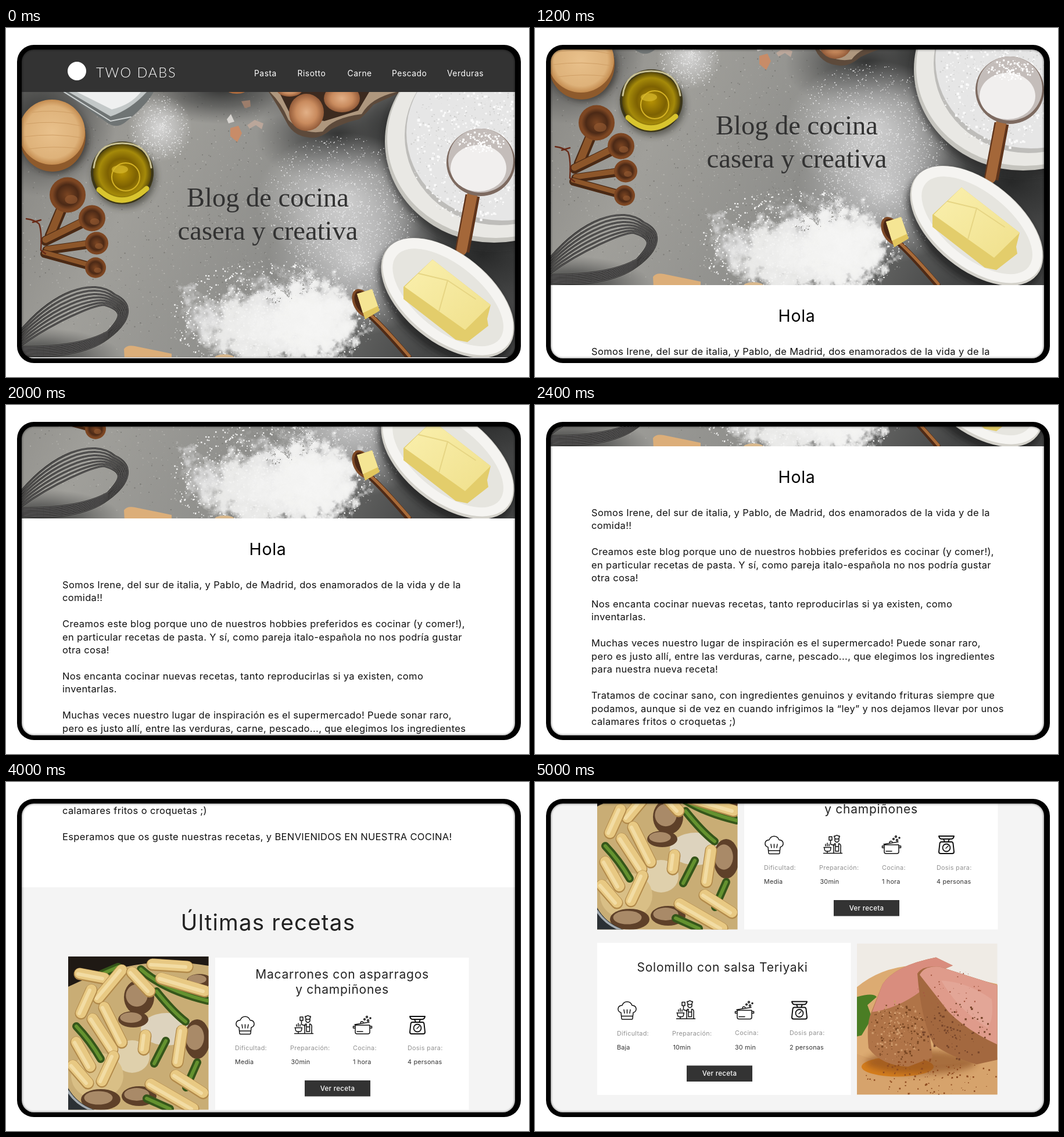
Recreate the animation shown at these times as an HTML page. Size 900 by 600 pixels, loop 6 s.

```html
<!DOCTYPE html>
<html lang="es">
<head>
<meta charset="utf-8">
<title>Blog de cocina</title>
<style>
  html, body { margin: 0; width: 100%; height: 100%; overflow: hidden; background: #fff; }
  svg { position: absolute; left: 0; top: 0; display: block; }
  text { font-family: Inter, "Open Sans", sans-serif; font-optical-sizing: none; white-space: pre; }
  .brand { font: 300 23.5px Lato, sans-serif; letter-spacing: 2px; fill: #fff; }
  .nav { font-size: 13.8px; letter-spacing: .55px; fill: #fff; }
  .title { font: 46.5px "Liberation Serif", serif; fill: #323232; text-anchor: middle; }
  .hello { font-size: 28.5px; letter-spacing: .7px; text-anchor: middle; }
  .body { font-size: 16.5px; letter-spacing: .35px; fill: #111; }
  .latest { font-size: 38.5px; letter-spacing: 1.2px; fill: #222; text-anchor: middle; }
  .dish { font-size: 21px; letter-spacing: .75px; fill: #222; text-anchor: middle; }
  .label { font-size: 10.8px; letter-spacing: .3px; fill: #929292; }
  .value { font-size: 10.8px; letter-spacing: .2px; fill: #333; }
  .button { font-size: 11.5px; font-weight: 500; letter-spacing: .3px; fill: #fff; text-anchor: middle; }
  .icon { fill: none; stroke: #111; stroke-width: 1.5; stroke-linecap: round; stroke-linejoin: round; }
</style>
</head>
<body>
<svg id="stage" width="900" height="600" viewBox="0 0 900 600"></svg>
<script>
const LOOP = 6000, HOLD = 1000, STEP = 200, STEPS = 21, TRAVEL = 1300;

const text = (cls, x, y, s) => `<text class="${cls}" x="${x}" y="${y}">${s}</text>`;
const rect = (x, y, w, h, fill) => `<rect x="${x}" y="${y}" width="${w}" height="${h}" fill="${fill}"/>`;
const oval = (x, y, rx, ry, fill, more = '') => `<ellipse cx="${x}" cy="${y}" rx="${rx}" ry="${ry}" fill="${fill}" ${more}/>`;
const shape = (d, fill, more = '') => `<path d="${d}" fill="${fill}" ${more}/>`;
const line = (d, color, w, cap = 'round') =>
  `<path d="${d}" fill="none" stroke="${color}" stroke-width="${w}" stroke-linecap="${cap}"/>`;
const at = (x, y, s, more = '') => `<g transform="translate(${x} ${y})" ${more}>${s}</g>`;
const clip = (id, s) => `<g clip-path="url(#${id})">${s}</g>`;
const filtered = (id, s) => `<g filter="url(#${id})">${s}</g>`;

function random(seed) {
  return () => (seed = (seed * 16807) % 2147483647) / 2147483647;
}

// Small squares scattered densely in the middle of an oval
function specks(seed, count, cx, cy, rx, ry, fill, max = 2) {
  const rnd = random(seed);
  let d = '';
  for (let i = 0; i < count; i++) {
    const a = rnd() * Math.PI * 2, r = rnd() ** .7, s = (.5 + rnd() * max).toFixed(1);
    d += `M${(cx + Math.cos(a) * r * rx).toFixed(1)} ${(cy + Math.sin(a) * r * ry).toFixed(1)}h${s}v${s}h-${s}z`;
  }
  return shape(d, fill);
}

const gradient = (id, stops) => `<radialGradient id="${id}">${stops.map(([o, c, a = 1]) =>
  `<stop offset="${o}" stop-color="${c}" stop-opacity="${a}"/>`).join('')}</radialGradient>`;

const defs = `<defs>
  <clipPath id="screen"><rect x="26" y="36" width="850.5" height="532.5" rx="21"/></clipPath>
  <clipPath id="heroBox"><rect x="26" y="110" width="851" height="456"/></clipPath>
  <clipPath id="pastaBox"><rect width="241.5" height="263.5"/></clipPath>
  <clipPath id="meatBox"><rect width="241.5" height="260"/></clipPath>
  <filter id="soft" x="-30%" y="-30%" width="160%" height="160%"><feGaussianBlur stdDeviation="6"/></filter>
  <filter id="edge"><feGaussianBlur stdDeviation="1.4"/></filter>
  <filter id="ragged" x="-20%" y="-20%" width="140%" height="140%">
    <feTurbulence type="fractalNoise" baseFrequency=".045" numOctaves="5" seed="4"/>
    <feDisplacementMap in="SourceGraphic" scale="75" xChannelSelector="R" yChannelSelector="G"/>
  </filter>
  <linearGradient id="stone" x2="1" y2=".25">
    <stop offset="0" stop-color="#868581"/><stop offset=".3" stop-color="#a09f9a"/>
    <stop offset=".6" stop-color="#8f8f8c"/><stop offset="1" stop-color="#454646"/>
  </linearGradient>
  <linearGradient id="butter" x2="1" y2="1">
    <stop offset="0" stop-color="#faf0ae"/><stop offset="1" stop-color="#f0e08c"/>
  </linearGradient>
  ${gradient('dark', [[0, '#222323', .85], [.5, '#303131', .5], [1, '#444', 0]])}
  ${gradient('flour', [[0, '#f6f6f5'], [.75, '#f2f2f1', .9], [1, '#e8e8e8', .1]])}
  ${gradient('dust', [[0, '#e9e9ea', .75], [.5, '#e0e0e1', .45], [1, '#ddd', 0]])}
  ${gradient('oil', [[0, '#b99505'], [.5, '#7d6102'], [.8, '#a58a0a'], [1, '#574708']])}
  ${gradient('wood', [[0, '#e9c18c'], [.8, '#deb27a'], [1, '#c48c50']])}
  ${gradient('cup', [[0, '#7b4522'], [.7, '#4b2916'], [1, '#7c4623']])}
  ${gradient('egg', [[0, '#e2b087'], [.6, '#c98b5e'], [1, '#935b39']])}
</defs>`;

function measuringSpoon(x, y, r, hx, hy, w) {
  return line(`M${x} ${y}L${hx} ${hy}`, '#4a2914', w + 2) +
    line(`M${x - 1} ${y - 2}L${hx} ${hy - 2}`, '#8d562a', w - 4) +
    oval(x, y, r, r * .98, '#7d4622') + oval(x, y, r * .84, r * .82, 'url(#cup)') +
    oval(x + r * .2, y + r * .25, r * .35, r * .25, '#9a5e34', 'opacity=".6"');
}

function hero() {
  const backdrop = rect(26, 110, 851, 456, 'url(#stone)') +
    specks(3, 900, 330, 340, 330, 250, '#b2b1ac', 1.6) + specks(7, 700, 330, 340, 330, 250, '#7b7a76', 1.6) +
    oval(570, 185, 140, 85, 'url(#dark)') + oval(370, 105, 150, 60, 'url(#dark)') +
    oval(670, 165, 80, 100, 'url(#dark)') + oval(820, 390, 170, 100, 'url(#dark)') +
    oval(60, 160, 130, 130, 'url(#dark)') + oval(60, 566, 140, 50, 'url(#dark)');

  const flour = oval(265, 172, 55, 58, 'url(#dust)') + specks(5, 420, 265, 172, 52, 58, '#eee', 1.3) +
    oval(580, 295, 150, 115, 'url(#dust)') + oval(600, 400, 150, 130, 'url(#dust)') +
    specks(11, 1300, 575, 300, 135, 115, '#ededee', 1.2) + specks(13, 700, 600, 410, 110, 110, '#e6e6e7', 1.2) +
    filtered('ragged', oval(470, 515, 150, 72, 'url(#flour)') + oval(490, 455, 95, 42, 'url(#dust)') +
      oval(530, 500, 90, 75, 'url(#flour)') + oval(310, 460, 16, 24, 'url(#dust)') + oval(340, 500, 45, 42, 'url(#dust)')) +
    specks(23, 1200, 460, 495, 180, 95, '#f4f4f3', 2.2) +
    filtered('ragged', specks(31, 60, 470, 430, 80, 40, '#8f8f8c', 4));

  const left = shape('M98 110L176 164Q190 173 204 163Q240 135 254 110Z', '#6f7474') +
    shape('M108 110L180 152Q215 140 242 110Z', '#c3c8c8') + shape('M122 110L182 140Q215 132 232 110Z', '#eff0f0') +
    line('M100 110L180 160L215 153', '#cfd3d3', 2) +
    oval(85, 192, 56, 58, '#2e2a27', 'filter="url(#soft)" opacity=".7"') +
    oval(80, 186, 57, 61, '#8e5a2c') + oval(79, 179, 57, 56, 'url(#wood)') +
    line('M35 165Q80 158 128 168M31 187Q80 180 133 189M40 208Q80 202 125 207M45 145Q80 140 118 147', '#cf9f66', 1) +
    oval(203, 256, 55, 53, '#2d2d25', 'filter="url(#soft)" opacity=".6"') +
    oval(200, 249, 54, 54, '#3c3618') + oval(200, 249, 50, 49, 'url(#oil)') +
    line('M151 240Q156 198 200 198Q244 198 250 240', '#c9c193', 3) +
    line('M160 278Q200 315 242 276', '#d9c52e', 9) +
    `<circle cx="206" cy="256" r="24" fill="none" stroke="#d5b324" stroke-width="2"/>` +
    oval(196, 243, 14, 7, '#d9b92d', 'opacity=".7"') +
    measuringSpoon(106, 287, 31, 76, 358, 17) + measuringSpoon(148, 327, 23, 68, 366, 15) +
    measuringSpoon(156, 370, 20, 70, 382, 13) + measuringSpoon(154, 412, 18, 66, 388, 12) +
    line('M35 328Q50 330 57 337Q62 350 60 382L68 388M46 334L60 330', '#682a17', 2.4);

  let whisk = '';
  for (let i = 0; i < 7; i++) {
    const k = i * 9, e = 212 - i * 3;
    const d = `M20 ${526 + i * 4}C80 ${452 + k} 150 ${428 + k * .9} ${e - 25} ${458 + i * 3}` +
      `C${e + 10} ${474 + i * 2} ${e + 3} ${505 - i} 175 ${534 - i * 2}C140 ${560 - i * 3} 80 ${568 - i * 3} 20 ${560 - i * 2}`;
    whisk += line(d, '#2d2c2a', 3) + line(d, '#87868a', .8);
  }

  const pins = shape('M203 552Q208 544 222 547L285 560V570H204Z', '#dcae79') + oval(376, 567, 17, 6, '#d9b88c');

  const eggs = shape('M448 104Q466 130 486 168Q498 186 520 188Q540 192 560 174Q590 160 608 157Q622 145 632 132L676 112V104Z', '#5d4a3b') +
    shape('M452 108Q474 128 486 158Q512 184 545 178Q562 154 612 148Q628 120 672 110Z', '#ae977e') +
    shape('M470 110L490 150L548 160L606 142L625 110Z', '#3c2a1f') +
    oval(488, 106, 22, 12, 'url(#egg)') + oval(517, 145, 30, 32, 'url(#egg)') + oval(578, 121, 31, 24, 'url(#egg)') +
    oval(397, 105, 18, 8, '#b06c3d') +
    shape('M386 172L400 168L406 181L398 196L386 186Z', '#c88c68') +
    shape('M405 126L420 124L421 135L411 138Z', '#9c7d6b') +
    shape('M380 157L387 148L393 161L383 164Z', '#d7d4d0') +
    shape('M415 167L428 158L443 164L440 174L430 167L419 173Z', '#baa69a');

  const bowl = oval(838, 204, 188, 174, '#262727', 'filter="url(#soft)" opacity=".6"') +
    oval(840, 195, 188, 174, '#c5c4be') + oval(843, 191, 187, 170, '#e9e8e4') +
    oval(849, 185, 163, 154, '#bebdba') + oval(853, 180, 164, 151, '#e6e6e6') +
    specks(47, 500, 800, 200, 105, 130, '#fafafa', 4) + specks(53, 500, 800, 200, 105, 130, '#cfcfce', 2) +
    line('M803 288L785 384', '#5f341b', 25, 'butt') + line('M802 288L784 382', '#a46739', 18) +
    oval(817, 231, 59, 58, '#7d6a60') + oval(817, 228, 56, 55, '#c4bdba') +
    oval(813, 241, 48, 40, '#f1efee') + specks(61, 120, 817, 195, 40, 18, '#fff', 3);

  const dish = `<g transform="rotate(39 760 464)">` +
    oval(764, 474, 136, 78, '#1c1d1d', 'filter="url(#soft)" opacity=".7"') +
    oval(760, 464, 134, 76, '#d3d1ca') + oval(759, 462, 132, 73, '#f5f4f1') + oval(760, 463, 114, 56, '#e6e5df') + '</g>' +
    shape('M734 398L834 476L828 500L830 512L794 540L774 536L684 466L684 445Z', '#e3cd6b') +
    shape('M734 398L834 476L790 519L686 445Z', 'url(#butter)') +
    line('M710 422L760 434L745 487M760 434L808 466', '#e6d584', 2);

  const spoon = line('M622 490Q645 510 693 566', '#4e2a16', 10) + line('M626 492Q647 510 694 564', '#a86a38', 5) +
    `<g transform="rotate(-28 614 473)">${oval(614, 473, 16, 26, '#7e4925') + oval(615, 473, 13, 22, '#4b2815')}</g>` +
    shape('M604 457L630 449L643 486L618 501Z', '#e2c65d') + shape('M604 457L630 449L640 478L614 490Z', '#f5e594');

  return clip('heroBox', backdrop + flour + left + whisk + pins + eggs + bowl + dish + spoon) +
    text('title', 450.5, 306.5, 'Blog de cocina') + text('title', 450.5, 364, 'casera y creativa');
}

function pasta() {
  const tubes = [[20, 30, 62, 38], [145, 14, 205, 18], [160, 38, 235, 60], [92, 24, 52, 72], [40, 58, 22, 98],
    [42, 108, 76, 160], [62, 88, 92, 148], [14, 148, 38, 190], [8, 188, 34, 218], [78, 172, 58, 215],
    [196, 128, 188, 182], [133, 136, 130, 160], [142, 220, 215, 262], [110, 28, 140, 60], [185, 205, 232, 235]];
  const stalks = ['M125 22Q165 58 240 76', 'M152 60Q180 95 202 112', 'M14 120Q38 145 56 176',
    'M168 145L148 184', 'M222 182L203 225', 'M135 244L175 262', 'M58 30L86 18'];
  const caps = [[122, 70, 26, 30], [112, 108, 26, 14], [222, 142, 22, 34], [56, 246, 34, 18], [122, 240, 30, 17], [226, 42, 22, 12]];
  return clip('pastaBox', rect(0, 0, 242, 264, '#c9ad75') +
    shape('M0 0H242V16Q120 -6 0 52Z', '#1f1914') +
    oval(170, 125, 45, 28, '#ddd3be') + oval(110, 172, 30, 28, '#dfd0ac') + oval(50, 205, 45, 40, '#d9bf86') +
    caps.map(([x, y, a, b]) => oval(x, y, a, b, '#5e4029') + oval(x - 4, y - 3, a * .72, b * .64, '#a98a68')).join('') +
    stalks.map(d => line(d, '#35561a', 14) + line(d, '#64922f', 6)).join('') +
    tubes.map(([a, b, c, d]) => line(`M${a} ${b}L${c} ${d}`, '#b28a4a', 21) +
      line(`M${a} ${b - 1}L${c} ${d - 1}`, '#e8c983', 18) + line(`M${a - 3} ${b}L${c - 3} ${d}`, '#f2dca4', 6)).join('') +
    shape('M0 226Q14 252 46 264H0Z', '#2b3034') + line('M0 232Q14 254 40 264', '#a3abb1', 4));
}

function meat() {
  return clip('meatBox', rect(0, 0, 242, 260, '#efebe5') +
    shape('M0 75Q40 42 95 38L242 70V260H0Z', '#dcab72') + shape('M0 190Q90 225 242 196V260H0Z', '#d6a36c') +
    oval(70, 212, 62, 17, '#d77f1d') + shape('M0 92Q28 84 34 92L18 106L26 128L8 158L0 160Z', '#4a7d24') +
    oval(110, 204, 95, 20, '#8a4d24', 'filter="url(#soft)" opacity=".65"') +
    shape('M44 70Q65 38 136 24L165 38L108 62L124 145L130 196L88 212Q42 210 20 180Q16 140 24 120Z', '#b07448') +
    shape('M44 70Q65 38 136 24L165 38L108 60L110 82Q70 112 26 118Z', '#d98d7e') +
    shape('M104 52Q112 38 142 40L242 72V200L206 208Q160 194 132 174Q110 130 104 52Z', '#a3683f') +
    shape('M108 54Q116 38 142 40L242 72V174Q190 150 158 118Z', '#df9b8b') +
    shape('M145 64Q190 66 232 96Q236 130 225 145Q175 115 145 64Z', '#e3a697') +
    specks(71, 150, 70, 150, 48, 55, '#794723', 3) + specks(73, 130, 168, 150, 60, 48, '#77452a', 3) +
    specks(77, 120, 70, 150, 45, 55, '#cf9a6c', 3) +
    specks(79, 120, 130, 228, 115, 32, '#8e4a1f', 2.5) + specks(83, 45, 155, 80, 60, 40, '#a45741', 2));
}

const icons = {
  hat: `<path d="M6 20C-1 18 -1 8 8 7.500C11 -1 22 -1 25 7.500C34 8 34 18 27 20L26 30Q26 31.500 24.500 31.500H8.500Q7 31.500 7 30ZM7 26H26M16.500 15V21M11 15L12 21M22 15L21 21"/>`,
  cook: `<path d="M0.500 30.500H32.500M1 20.500H13.500M2 21Q2 27 5 27H10Q13 27 13 21M7 27V30M4 18V15M7 18V13M10 18V15M10 2H15V8H10ZM12.500 8V15L19 17M20 6V4Q17 0 21 1Q23.500 -2 26 1Q30 0 27 4V6ZM20 6V9Q23.500 14 27 9V6M20 14Q17 15 18 21V30M27 14Q31 15 30 21V30M21 19H26.500V27H21ZM21 14V19M26.500 14V19"/>`,
  pot: `<path d="M4 16H29V28Q29 31 26 31H7Q4 31 4 28ZM4 18H0.500V21H4M29 18H32.500V21H29M3 15L28 11M13 12Q14 8 18 11M7 27H17"/><circle cx="20" cy="6" r="1.3"/><circle cx="26" cy="8" r="1.500"/><circle cx="24" cy="2" r="1.400"/><circle cx="30" cy="4" r="1"/>`,
  scale: `<path stroke-width="2" d="M1 1H27Q26 6 22 6H6Q2 6 1 1ZM9 6L11 11M19 6L17 11M5 11H23Q25 11 25.500 14L27 28Q27 31 24 31H4Q1 31 1 28L2.500 14Q3 11 5 11Z"/><circle cx="14" cy="21" r="6.500" stroke-width="1.800"/><path d="M13 22L17 18"/>`
};

// One recipe card, drawn from its top left corner
function card(title, titleX, titleY, values) {
  const cols = [['hat', 35, 34, 'Dificultad:'], ['cook', 136, 129, 'Preparación:'],
    ['pot', 237, 237, 'Cocina:'], ['scale', 334, 331, 'Dosis para:']];
  return rect(0, 0, 436.5, 261.5, '#fff') +
    title.map((s, i) => text('dish', titleX, titleY + i * 26, s)).join('') +
    cols.map(([icon, ix, x, label], i) => at(ix, 100, icons[icon], 'class="icon"') +
      text('label', x, i < 2 ? 159.3 : 158.7, label) + text('value', i === 1 ? x + 1.5 : x, 183, values[i])).join('') +
    rect(154, 211, 113, 27.5, '#333') + text('button', 210.5, 228.7, 'Ver receta');
}

const story = [
  'Somos Irene, del sur de italia, y Pablo, de Madrid, dos enamorados de la vida y de la', 'comida!!', '',
  'Creamos este blog porque uno de nuestros hobbies preferidos es cocinar (y comer!),',
  'en particular recetas de pasta. Y sí, como pareja italo-española no nos podría gustar', 'otra cosa!', '',
  'Nos encanta cocinar nuevas recetas, tanto reproducirlas si ya existen, como', 'inventarlas.', '',
  'Muchas veces nuestro lugar de inspiración es el supermercado! Puede sonar raro,',
  'pero es justo allí, entre las verduras, carne, pescado..., que elegimos los ingredientes', 'para nuestra nueva receta!', '',
  'Tratamos de cocinar sano, con ingredientes genuinos y evitando frituras siempre que',
  'podamos, aunque si de vez en cuando infrigimos la “ley” y nos dejamos llevar por unos', 'calamares fritos o croquetas ;)', '',
  'Esperamos que os guste nuestras recetas, y BENVIENIDOS EN NUESTRA COCINA!'
];

const menu = [['Pasta', 427], ['Risotto', 501.5], ['Carne', 587.5], ['Pescado', 664], ['Verduras', 759]];

const page = rect(26, 30, 851, 80, '#333') + oval(122, 74, 16, 16, '#fff') + text('brand', 155, 85, 'TWO DABS') +
  menu.map(([s, x]) => text('nav', x, 83, s)).join('') + hero() +
  text('hello', 450.5, 629, 'Hola') +
  story.map((s, i) => text('body', 97, (686 + i * 22.43).toFixed(1), s)).join('') +
  rect(26, 1171, 851, 720, '#f4f4f4') + text('latest', 451, 1245, 'Últimas recetas') +
  at(107, 1290, pasta()) +
  at(360, 1292, card(['Macarrones con asparragos', 'y champiñones'], 218.5, 36, ['Media', '30min', '1 hora', '4 personas'])) +
  at(107, 1576.5, card(['Solomillo con salsa Teriyaki'], 215.5, 49.5, ['Baja', '10min', '30 min', '2 personas'])) +
  at(554, 1577.5, meat());

// Rounded rectangle with circular corners
const box = (x, y, w, h, r) => {
  const arc = (dx, dy) => `a${r} ${r} 0 0 1 ${dx} ${dy}`;
  return `M${x + r} ${y}h${w - 2 * r}${arc(r, r)}v${h - 2 * r}${arc(-r, r)}h${2 * r - w}${arc(-r, -r)}v${2 * r - h}${arc(r, -r)}z`;
};
const inner = box(27, 37, 849, 531, 21);
const bezel = clip('screen', filtered('edge', `<path d="${inner}" fill="none" stroke="#000" stroke-width="2" opacity=".5"/>`)) +
  shape(box(19, 29, 867, 547, 29) + inner, '#000', 'fill-rule="evenodd"');

document.getElementById('stage').innerHTML = defs + clip('screen', `<g id="page">${page}</g>`) + bezel;

const pageNode = document.getElementById('page');
let shown = -1;

function draw() {
  const t = performance.now() % LOOP;
  const n = Math.max(0, Math.min(STEPS, Math.floor((t - HOLD) / STEP) + 1));
  if (n !== shown) {
    shown = n;
    pageNode.setAttribute('transform', `translate(0 ${-Math.round(TRAVEL * n / STEPS)})`);
  }
  requestAnimationFrame(draw);
}
draw();
</script>
</body>
</html>
```
